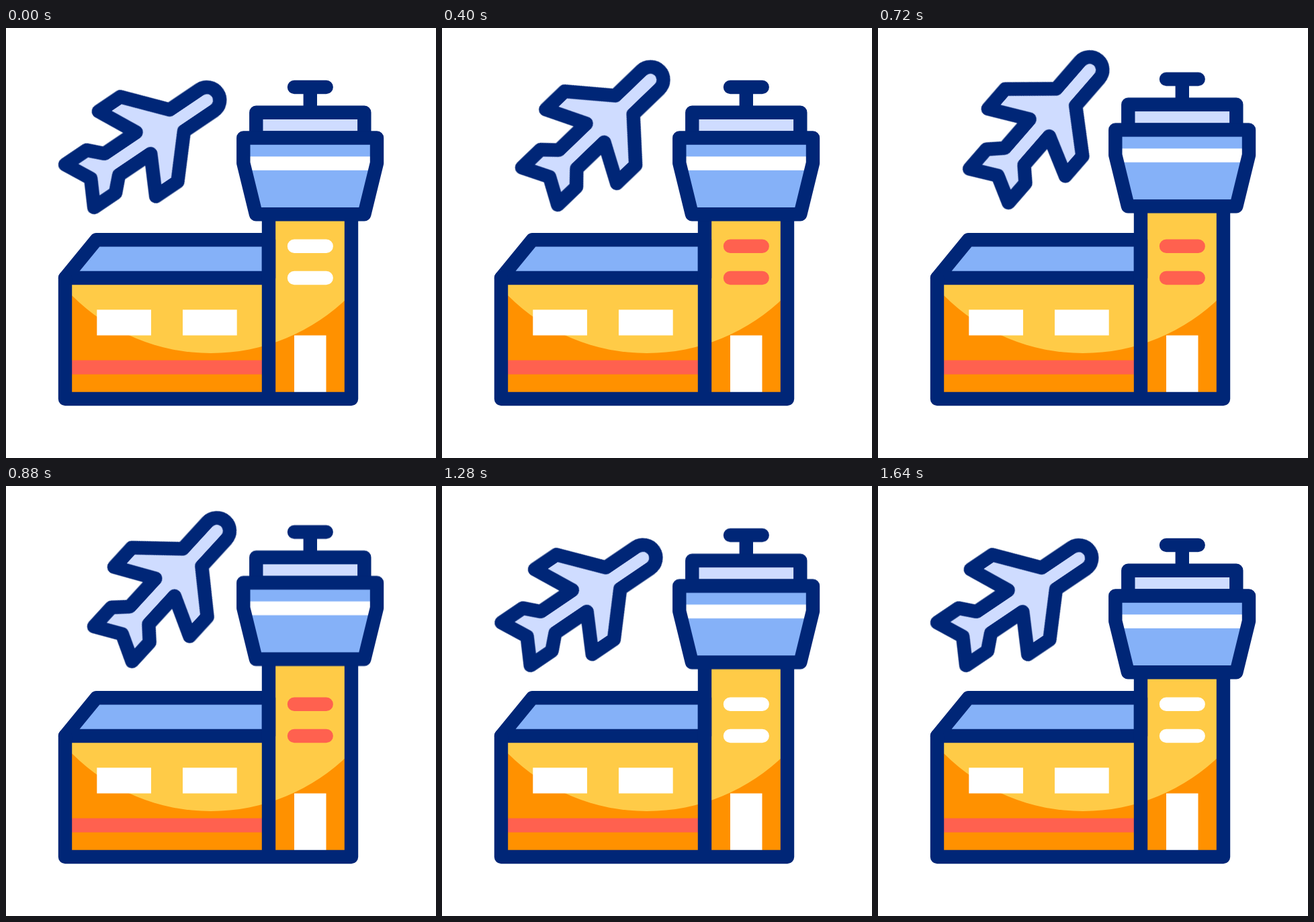
These frames come from a looping animation (640x640 px, 1.76 s). An HTML page:

```html
<!DOCTYPE html>
<html lang="en">
<head>
<meta charset="utf-8">
<title>Airport</title>
<style>
  html, body { margin: 0; width: 100%; height: 100%; overflow: hidden; background: #fff; }
  svg { display: block; width: 100vw; height: 100vh; }
  .line { stroke: #002677; stroke-width: 20.4; stroke-linecap: round; stroke-linejoin: round; fill: none; }
  .pale { fill: #cfdcff; }
  .blue { fill: #85b1f8; }
  .white { fill: #fff; }
  .plane, .cabin, .lamps {
    animation: fly 1760ms cubic-bezier(.5, 0, .5, 1) infinite;
  }
  .plane { transform-origin: 205px 175px; }
  .cabin { animation-name: lift; }
  .lamps {
    stroke: #fff; stroke-width: 20.4; stroke-linecap: round;
    animation-name: blink; animation-timing-function: step-end;
  }
  @keyframes fly {
    0%, 2.27%, 75.57%, 100% { transform: translate(0, 0) rotate(0deg); }
    37.5%, 41.76% { transform: translate(36.8px, -23px) rotate(-15deg); }
  }
  @keyframes lift {
    0%, 22.16%, 93.47%, 100% { transform: translateY(0); }
    57.39%, 59.38% { transform: translateY(-21px); }
  }
  @keyframes blink {
    0%, 57.95%, 100% { stroke: #fff; }
    20.45% { stroke: #ff614f; }
  }
</style>
</head>
<body>
<svg viewBox="0 0 640 640">
  <defs>
    <clipPath id="walls"><path d="M88 372H391V240H514V552H88Z"/></clipPath>
  </defs>

  <!-- terminal and tower shaft -->
  <g clip-path="url(#walls)">
    <rect x="88" y="240" width="426" height="312" fill="#ff9100"/>
    <circle cx="305" cy="192" r="292" fill="#ffcb47"/>
    <rect x="88" y="494.5" width="303" height="21" fill="#ff614f"/>
  </g>
  <g class="white">
    <rect x="135.3" y="419.3" width="80.7" height="38.2"/>
    <rect x="263" y="419.3" width="80.7" height="38.2"/>
    <rect x="429" y="457.5" width="47.5" height="94"/>
  </g>
  <path class="lamps" d="M429 324.7H476.7M429 372H476.7"/>
  <path class="line blue" d="M88 372L134.5 315.3H391V372Z"/>
  <path class="line" d="M88 372V552H514V240M391 240V552"/>

  <!-- control cabin -->
  <g class="cabin">
    <path class="line" d="M429 88H476.7M452.8 88V125"/>
    <path class="line pale" d="M372.3 163.5V125.7H533.3V163.5Z"/>
    <path class="blue" d="M353.3 163.5H552V201L533.3 277.3H372L353.3 201Z"/>
    <rect class="white" x="358" y="191.3" width="189" height="20.5"/>
    <path class="line" d="M353.3 163.5H552V201L533.3 277.3H372L353.3 201Z"/>
  </g>

  <!-- plane, drawn along its own axis with the nose at the origin -->
  <g class="plane">
    <path class="line pale" transform="translate(299 107.4) rotate(-34)"
      d="M0 -19.3H-54L-104 -76.3H-143L-114 -19.3H-171L-190 -38.5H-228.5L-208.5 0
         L-228.5 38.5H-190L-171 19.3H-114L-143 76.3H-104L-54 19.3H0A19.3 19.3 0 0 0 0 -19.3Z"/>
  </g>
</svg>
</body>
</html>
```
